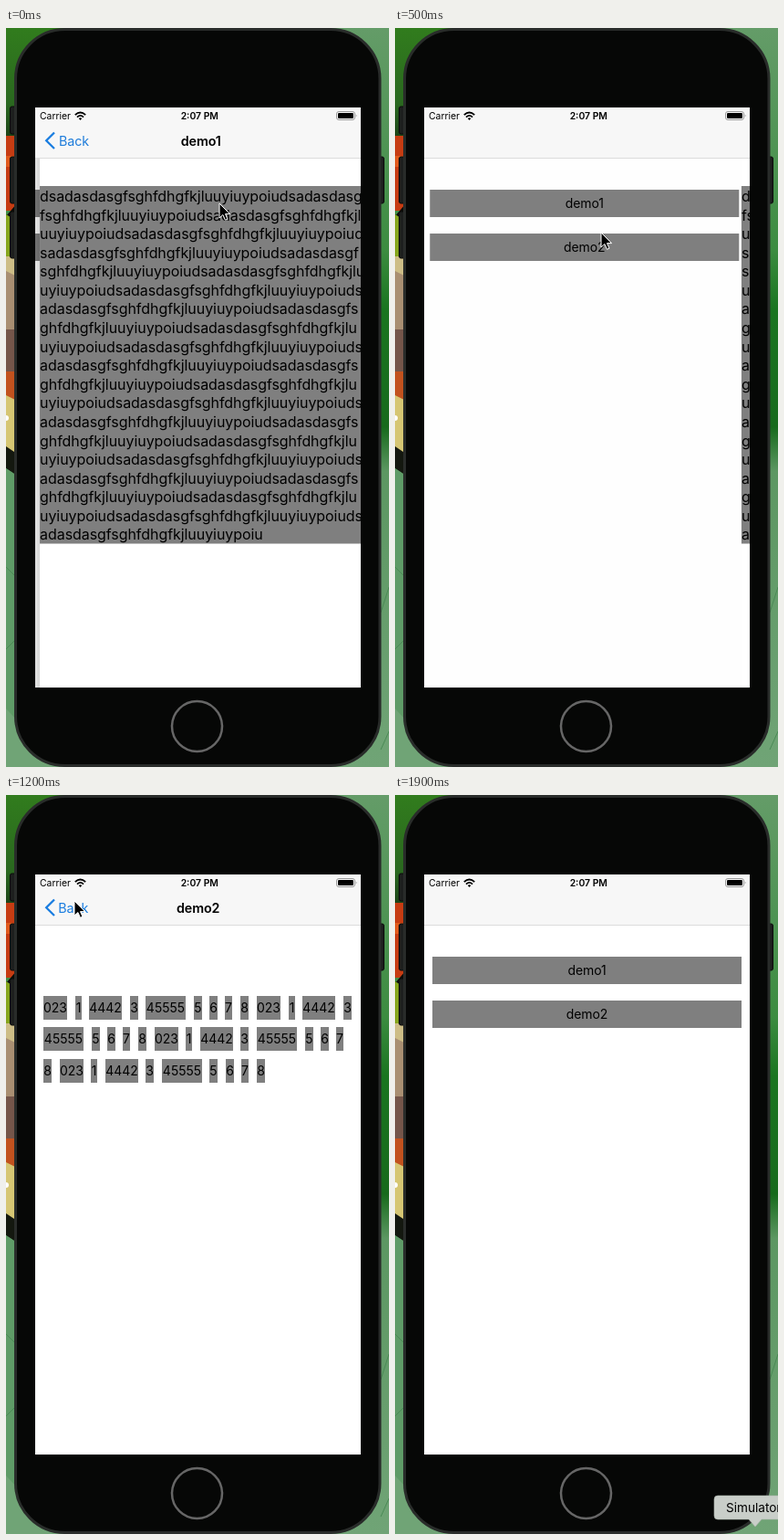
An HTML page for the animation above (2000 ms loop, 420x809 px).

```html
<!DOCTYPE html>
<html lang="en">
<head>
<meta charset="utf-8">
<title>Navigation demo</title>
<style>
  html, body { margin: 0; width: 100%; height: 100%; overflow: hidden; background: #5f9f68; }
  svg { display: block; font-family: Inter, Roboto, sans-serif; }
  .mid { text-anchor: middle; }
  .title { font-size: 14.3px; font-weight: 600; letter-spacing: -.1px; }
  .button { font-size: 14px; letter-spacing: -.1px; }
  .tag { font-size: 14px; }
  .prose { font-size: 16px; letter-spacing: -.06px; }
  .status { font-size: 10.4px; }
</style>
</head>
<body>
<svg id="stage" width="420" height="809" viewBox="0 0 420 809">
  <defs>
    <linearGradient id="leaf" x1="0" y1="0" x2="0" y2="1">
      <stop offset="0" stop-color="#649c68"/>
      <stop offset=".16" stop-color="#4f9454"/>
      <stop offset=".3" stop-color="#3c8c40"/>
      <stop offset=".38" stop-color="#1a7520"/>
      <stop offset=".54" stop-color="#176a1c"/>
      <stop offset=".6" stop-color="#5c9762"/>
      <stop offset="1" stop-color="#70a476"/>
    </linearGradient>
    <linearGradient id="grass" x1="0" y1="0" x2="0" y2="1">
      <stop offset="0" stop-color="#317c1d"/>
      <stop offset=".7" stop-color="#2a681f"/>
      <stop offset="1" stop-color="#1c4416"/>
    </linearGradient>
    <linearGradient id="edge">
      <stop offset="0" stop-color="#000" stop-opacity="0"/>
      <stop offset="1" stop-color="#000" stop-opacity=".05"/>
    </linearGradient>
    <clipPath id="screen"><rect x="32" y="87" width="357" height="635"/></clipPath>
  </defs>

  <rect width="420" height="809" fill="url(#leaf)"/>
  <rect width="70" height="118" fill="url(#grass)"/>
  <path d="M0 118H12V200H0z" fill="#c63c12"/>
  <path d="M0 140H12V152H0z" fill="#e05a1c"/>
  <path d="M0 206L12 192V212L0 204z" fill="#0c0c08"/>
  <path d="M0 204L12 212V252H0z" fill="#86a51c"/>
  <path d="M0 250H12V335H0z" fill="#a98f72"/>
  <path d="M0 250H12V272L0 266z" fill="#cdbd86"/>
  <path d="M0 330H12V378H0z" fill="#75564a"/>
  <path d="M0 376H12V408H0z" fill="#c2521e"/>
  <path d="M0 402L12 408V468L0 460z" fill="#d6c673"/>
  <circle cx="0" cy="427" r="3" fill="#fff"/>
  <path d="M0 458L12 466V490L0 482z" fill="#14180f"/>
  <path d="M0 482L12 490V809H0z" fill="#5f9b67"/>
  <path d="M0 590L12 602M0 680L12 668M411 640L420 612M411 790L420 770" stroke="#4a8a55" fill="none"/>
  <path d="M0 745V809H60z" fill="#70a476"/>

  <g fill="#1d1f1e" stroke="#0a0a0a">
    <rect x="4.500" y="86" width="10" height="30" rx="2"/>
    <rect x="4.500" y="141" width="10" height="51" rx="2"/>
    <rect x="4.500" y="201" width="10" height="51" rx="2"/>
    <rect x="405" y="141" width="9.500" height="51" rx="2"/>
  </g>
  <rect x="10.500" y="1.500" width="399.500" height="806" rx="54" fill="#060706" stroke="#292c2a" stroke-width="3"/>
  <circle cx="209.500" cy="764.500" r="27.500" fill="#060706" stroke="#666" stroke-width="2.500"/>

  <g clip-path="url(#screen)">
    <rect x="32" y="87" width="357" height="635" fill="#fff"/>
    <g id="root"></g>
    <rect id="dim" x="32" y="87" width="357" height="635"/>
    <g id="page">
      <rect id="shade" x="27" y="87" width="5" height="635" fill="url(#edge)"/>
      <rect x="32" y="87" width="357" height="635" fill="#fff"/>
      <g id="prose"></g>
      <g id="tags"></g>
    </g>

    <rect x="32" y="87" width="357" height="55" fill="#f7f7f7"/>
    <rect x="32" y="142" width="357" height="1" fill="#dcdcdc"/>
    <text class="status" x="37" y="100">Carrier</text>
    <g fill="none" stroke="#000" stroke-width="1.800">
      <path d="M75.800 95.200Q81.500 89.700 87.200 95.200M78 97.600Q81.500 94.200 85 97.600"/>
      <path d="M81.500 101L79.700 99Q81.500 97.400 83.300 99z" fill="#000" stroke="none"/>
    </g>
    <text class="status mid" x="212.300" y="100" font-weight="600">2:07 PM</text>
    <rect x="362.500" y="91.500" width="20" height="9" rx="2.500" fill="none" stroke="#999"/>
    <rect x="364" y="93" width="17" height="6" rx="1.300"/>
    <path d="M383.800 94.500Q385.600 96 383.800 97.500z" fill="#888"/>
    <path id="chevron" d="M53 114.500L44.200 123.300L53 132" fill="none" stroke="#1a7de0" stroke-width="2.300"/>
    <text id="back" y="128.500" font-size="14.300" letter-spacing="-.1">Back</text>
    <text id="title" class="title mid" y="128.500"></text>
  </g>

  <g id="tip">
    <path d="M354 767H424V793H402L395 801L388 793H354Q350 793 350 789V771Q350 767 354 767z" fill="#c9cec9" stroke="#a9b3a9" stroke-width=".6"/>
    <text x="363" y="785" font-size="13.600">Simulator</text>
  </g>
  <path id="cursor" d="M0 0V16L3.900 12.500L6.500 18.300L9 17.200L6.500 11.600H11.600z" fill="#000" stroke="#fff"/>
</svg>

<script>
const $ = id => document.getElementById(id);
const LOOP = 2000, STEP = 100, WIDTH = 357, LEFT = 32, GRAY = '#7f7f7f';

function add(parent, tag, attrs, text) {
  const el = document.createElementNS($('stage').namespaceURI, tag);
  for (const key in attrs) el.setAttribute(key, attrs[key]);
  if (text) el.textContent = text;
  parent.append(el);
}

function label(parent, x, y, w, h, cls, text, baseline) {
  add(parent, 'rect', { x, y, width: w, height: h, fill: GRAY });
  add(parent, 'text', { x: x + w / 2, y: y + baseline, class: cls + ' mid' }, text);
}

function buildRoot() {
  label($('root'), 41, 177, 339, 30, 'button', 'demo1', 20);
  label($('root'), 41, 225, 339, 30, 'button', 'demo2', 20);
}

function buildProse() {
  const unit = 'dsadasdasgfsghfdhgfkjluuyiuypoiu';
  const lengths = [42, 44, 43, 42, 44, 43];
  for (let i = 0; i < 4; i++) lengths.push(42, 43, 43);
  lengths.push(30);
  const all = unit.repeat(26);
  add($('prose'), 'rect', { x: LEFT, y: 173, width: 356, height: 391.5, fill: GRAY });
  let at = 0;
  lengths.forEach((n, i) => {
    add($('prose'), 'text', { x: LEFT, y: 190 + i * 20.58, class: 'prose' }, all.slice(at, at + n));
    at += n;
  });
}

function buildTags() {
  const words = ['023', '1', '4442', '3', '45555', '5', '6', '7', '8'];
  const widths = [26, 7, 36, 9, 44, 8.7, 8.8, 8.4, 9];
  const gap = 8.57, rows = [220, 254, 289];
  let x = 41, row = 0;
  for (let i = 0; i < 36; i++) {
    const w = widths[i % 9];
    if (x + w > 380) { x = 41; row++; }
    label($('tags'), Math.round(x), rows[row], Math.round(w), 26, 'tag', words[i % 9], 18);
    x += w + gap;
  }
}

const clamp = v => Math.max(0, Math.min(1, v));

// Critically damped spring: the share of the way still to go.
function spring(ms) {
  const k = Math.max(0, ms) * .03;
  return (1 + k) * Math.exp(-k);
}

// Which page is on the stack, and how far out it is (0 shown, 1 gone).
function pageAt(t) {
  if (t < 315) return { n: 1, out: spring(t + 208), slide: 220 };
  if (t < 728) return { n: 1, out: 1 - spring(t - 315), slide: 191 };
  if (t < 1260) return { n: 2, out: spring(t - 728), slide: 220 };
  return { n: 2, out: 1 - spring(t - 1260), slide: 191 };
}

const path = [
  [0, 234, 192], [100, 196, 178], [200, 100, 132], [300, 73, 120], [400, 110, 146],
  [500, 226, 224], [600, 216, 237], [900, 216, 237], [1000, 170, 198],
  [1100, 90, 124], [1200, 75, 116], [1300, 75, 116]
];

function cursorAt(t) {
  const i = path.findIndex(p => p[0] >= t);
  if (i < 1) return path[0].slice(1);
  const [t0, x0, y0] = path[i - 1], [t1, x1, y1] = path[i];
  const k = (t - t0) / (t1 - t0);
  return [x0 + (x1 - x0) * k, y0 + (y1 - y0) * k];
}

const shift = (id, x, y = 0) => $(id).setAttribute('transform', `translate(${x} ${y})`);
const fade = (id, v) => $(id).setAttribute('opacity', clamp(v));
const show = (id, on) => $(id).setAttribute('display', on ? 'inline' : 'none');

// The back label turns from gray to blue as its page comes in.
function backColor(cover) {
  const k = cover ** 3;
  const mix = (a, b) => Math.round(a + (b - a) * k);
  return `rgb(${mix(110, 26)} ${mix(110, 125)} ${mix(110, 224)})`;
}

function render(ms) {
  const t = Math.floor((ms % LOOP) / STEP) * STEP;
  const { n, out, slide } = pageAt(t);
  const cover = 1 - out;

  shift('page', WIDTH * out);
  shift('root', -.3 * WIDTH * cover);
  fade('dim', .11 * cover);
  fade('shade', cover);
  show('prose', n === 1);
  show('tags', n === 2);

  $('title').textContent = 'demo' + n;
  $('title').setAttribute('x', 210.7 + slide * out);
  $('back').setAttribute('x', 57.3 + 50 * out);
  $('back').setAttribute('fill', backColor(cover));
  fade('chevron', 1.7 * cover - .09);
  fade('title', 1.15 * cover - .09);
  fade('back', 1.1 * cover - .09);

  show('cursor', t <= 1300);
  if (t <= 1300) shift('cursor', ...cursorAt(t));
  show('tip', t >= 1800);
}

buildRoot();
buildProse();
buildTags();

const start = performance.now();
function tick() {
  render(performance.now() - start);
  requestAnimationFrame(tick);
}
tick();
</script>
</body>
</html>
```
